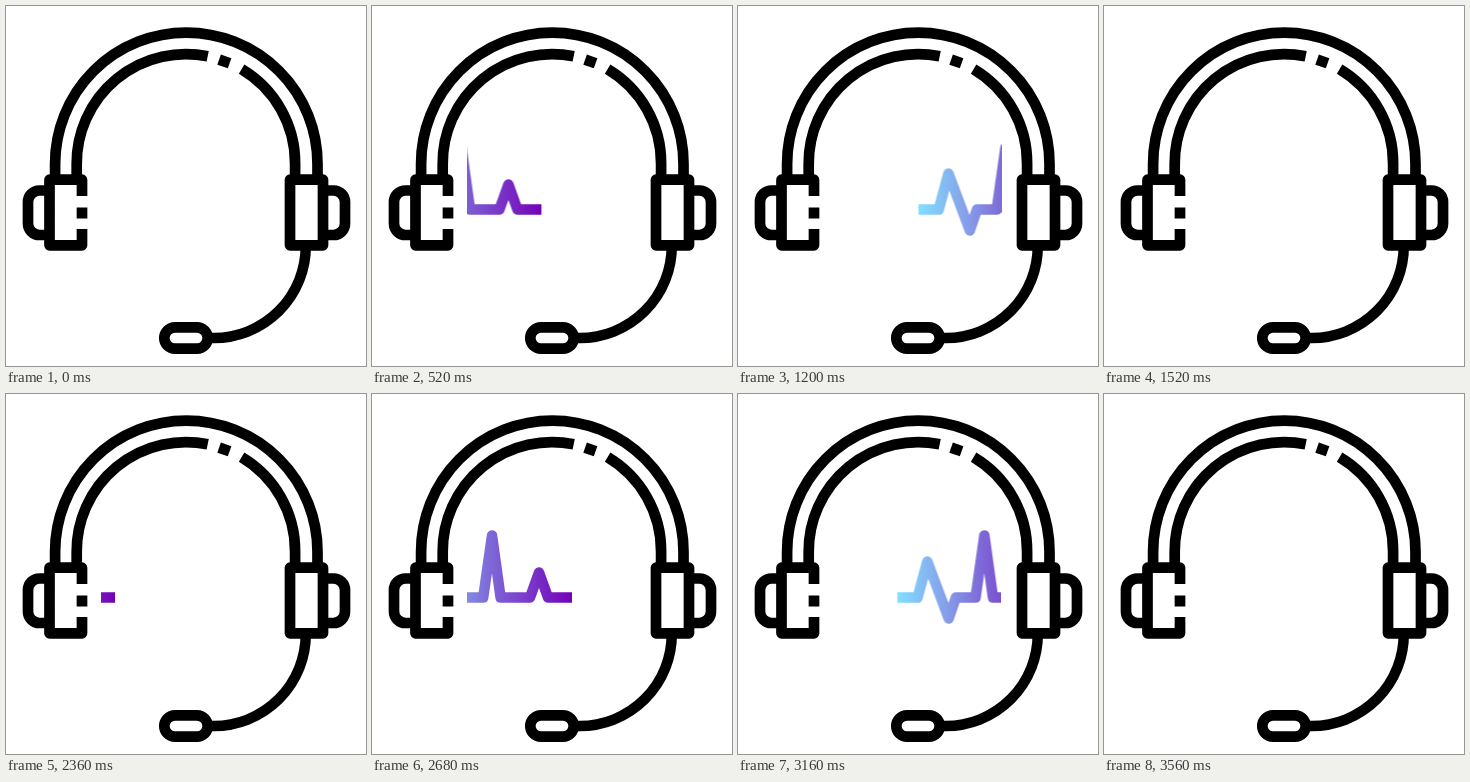
An HTML page that plays this animation: 360x360 px, repeating every 4.08 s.

```html
<!DOCTYPE html>
<html lang="en">
<head>
<meta charset="utf-8">
<title>Headset</title>
<style>
  html, body { margin: 0; width: 100%; height: 100%; overflow: hidden; background: #fff; }
  svg { display: block; width: 100vw; height: 100vh; }
  .line { fill: none; stroke: #000; stroke-width: 10.7; stroke-linejoin: round; }
  .wave {
    fill: none; stroke: url(#tint); stroke-width: 10.5; stroke-linejoin: round;
    animation: pass 2040ms infinite;
  }
  /* The pulse advances every 40 ms, with one held beat before it leaves. */
  @keyframes pass {
    0%     { transform: translateX(-180px); animation-timing-function: steps(1); }
    15.68% { transform: translateX(-154px); animation-timing-function: steps(5); }
    25.49% { transform: translateX(-93.6px); animation-timing-function: steps(8); }
    41.17% { transform: translateX(-12px);  animation-timing-function: steps(1); }
    43.13% { transform: translateX(0);      animation-timing-function: steps(8); }
    58.82% { transform: translateX(84.5px); animation-timing-function: steps(4); }
    66.66% { transform: translateX(130px);  animation-timing-function: steps(1); }
    70.58% { transform: translateX(152px);  animation-timing-function: steps(2); }
    74.5%, 100% { transform: translateX(180px); }
  }
</style>
</head>
<body>
<svg viewBox="0 0 360 360">
  <defs>
    <linearGradient id="tint" gradientUnits="userSpaceOnUse" x1="96" y1="0" x2="263" y2="0">
      <stop offset="0" stop-color="#82dfff"/>
      <stop offset=".3" stop-color="#879ce9"/>
      <stop offset=".5" stop-color="#7e6ad8"/>
      <stop offset="1" stop-color="#7402b8"/>
    </linearGradient>
    <clipPath id="window"><rect x="95" y="130" width="168.2" height="106"/></clipPath>
  </defs>

  <g class="line">
    <!-- headband -->
    <path d="M49.1 173V157.8A131.2 131.2 0 0 1 311.5 157.8V173"/>
    <path d="M70.7 173V157.8A109.2 109.2 0 0 1 201.7 50.3"/>
    <path d="M213.1 53.6L223.6 57.3"/>
    <path d="M235.6 63.2A109.2 109.2 0 0 1 289.1 157.8V173"/>
    <!-- left cup -->
    <path d="M76 190V173.7H43.5V239.3H76V223M76 201.5V212.5"/>
    <path d="M43 184.5H33.5A11.5 11.5 0 0 0 22 196V217.5A11.5 11.5 0 0 0 33.5 229H43"/>
    <!-- right cup -->
    <path d="M284 173.7H317V239.3H284Z"/>
    <path d="M317 184.5H327.5A11.5 11.5 0 0 1 339 196V217.5A11.5 11.5 0 0 1 327.5 229H317"/>
    <!-- microphone -->
    <path d="M299.8 240A92 92 0 0 1 207.8 332H203" stroke-width="10.5"/>
    <rect x="158.3" y="321.3" width="43.4" height="21.4" rx="10.7"/>
  </g>

  <g clip-path="url(#window)">
    <path class="wave" d="M96 203.5H116.2L126 167.5L147.3 224.5L154.5 203.5H174.2L183 141.5L191.6 203.5H221L230 178.5L239 203.5H263"/>
  </g>
</svg>
</body>
</html>
```
